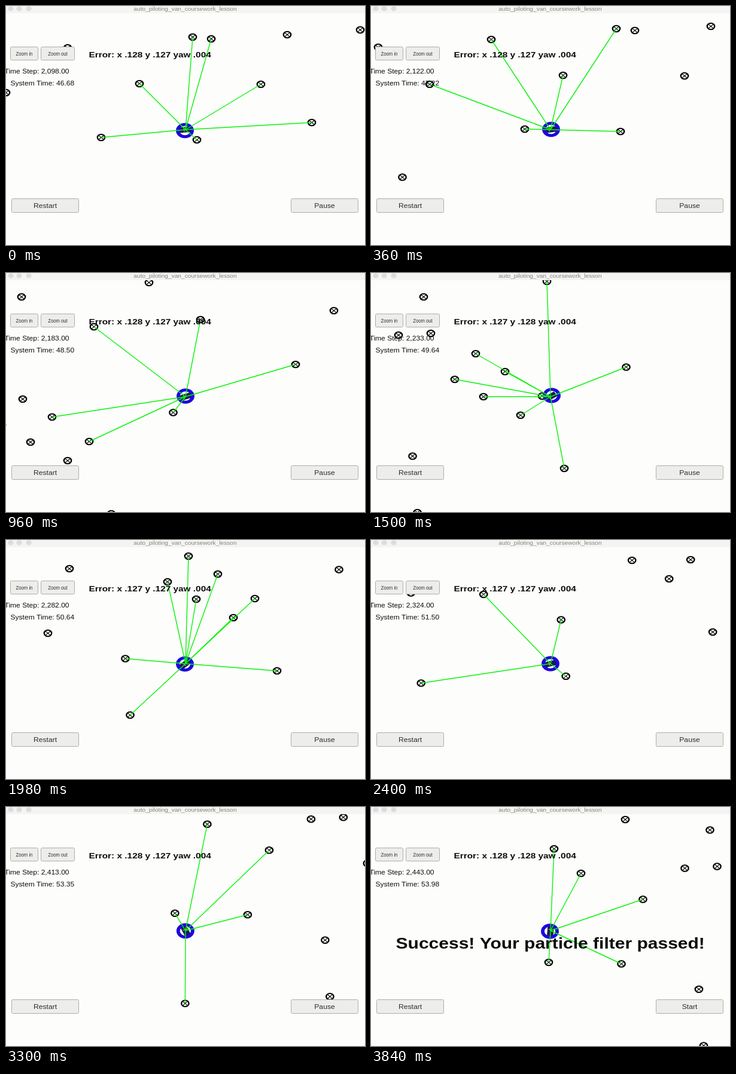
These frames come from a looping animation (600 by 400 pixels, 3960 ms). An HTML page with a canvas:

```html
<!DOCTYPE html>
<html lang="en">
<head>
<meta charset="utf-8">
<title>Particle filter</title>
<style>
  html, body { margin: 0; width: 100%; height: 100%; overflow: hidden; background: #fdfdfc; }
  canvas { display: block; }
</style>
</head>
<body>
<canvas id="stage" width="600" height="400"></canvas>
<script>
const ctx = document.getElementById('stage').getContext('2d');
const LOOP = 3960, FRAME = 60;
const ASPECT = 1.17;              // the whole picture is wider than it is tall
const CAR = { x: 300, y: 207 };
const SENSOR_RANGE = 231;

// Camera travel: shift in px, velocity in px per time step, ring offset from the car
const keys = [
  { t: 0,    step: 2098, sys: 46.68, x: 0,     y: 0,      vx: 4.2,  vy: -.5,  err: [128, 127], ox: -1, oy: 1.5 },
  { t: 360,  step: 2122, sys: 47.22, x: 98,    y: -14,    vx: 3.95, vy: -.68, err: [128, 127], ox: 1,  oy: -.5 },
  { t: 960,  step: 2183, sys: 48.50, x: 325,   y: -67,    vx: 3.35, vy: -1.2, err: [128, 127], ox: 0,  oy: -1 },
  { t: 1500, step: 2233, sys: 49.64, x: 472,   y: -143,   vx: 2.8,  vy: -1.9, err: [127, 128], ox: 2,  oy: -2 },
  { t: 1980, step: 2282, sys: 50.64, x: 602,   y: -251,   vx: 2.5,  vy: -2.3, err: [127, 127], ox: -1, oy: .5 },
  { t: 2880, step: 2372, sys: 52.48, x: 857.5, y: -310.5, vx: 2.55, vy: 1.03, err: [128, 127], ox: 1,  oy: -.5 },
  { t: 3600, step: 2443, sys: 53.98, x: 950.5, y: -144.5, vx: -.2,  vy: 2.7,  err: [128, 128], ox: -1, oy: 1 }
];

const landmarks = [
  [103, 70], [312, 52], [343, 55], [470, 48], [592, 40], [0, 145], [223, 130], [426, 131],
  [159, 220], [319, 224], [511, 195], [-86, 83], [-45.5, 300.5], [-299, 107], [-178, 157],
  [-297, 278], [-248, 308], [-186, 349], [-284, 350], [-222, 381], [-149, 470],
  [-384, 183], [-426, 247], [-372, 244], [-332, 321], [-402.5, 449.5], [-394.5, 544],
  [-496, 299], [-532, 407], [-653.5, 404.5], [-636.5, 555.5],
  [-525.5, 165.5], [-644.5, 214.5], [-599.5, 255.5]
];

const lerp = (a, b, u) => a + (b - a) * u;

function hermite(p, q, v, w, u) {
  const s = 1 - u;
  return s * s * ((1 + 2 * u) * p + u * v) + u * u * ((3 - 2 * u) * q - s * w);
}

function stateAt(time) {
  const end = keys.length - 1;
  const t = Math.min(time, keys[end].t);
  let i = 0;
  while (i < end - 1 && t >= keys[i + 1].t) i++;
  const a = keys[i], b = keys[i + 1];
  const u = (t - a.t) / (b.t - a.t), span = b.step - a.step;
  const mix = name => lerp(a[name], b[name], u);
  return {
    step: Math.round(mix('step')),
    sys: mix('sys'),
    x: hermite(a.x, b.x, a.vx * span, b.vx * span, u),
    y: hermite(a.y, b.y, a.vy * span, b.vy * span, u),
    heading: Math.atan2(-mix('vy'), -mix('vx')),
    ox: mix('ox'), oy: mix('oy'),
    err: (u < 1 ? a : b).err,
    done: time >= keys[end].t
  };
}

// Runs draw() around a point, with the horizontal stretch applied
function at(x, y, draw, stretch = ASPECT) {
  ctx.save();
  ctx.translate(x, y);
  ctx.scale(stretch, 1);
  draw();
  ctx.restore();
}

function text(str, x, y, size, { bold, center, color = '#0c0c0c', stretch } = {}) {
  at(x, y, () => {
    ctx.font = `${bold ? 'bold ' : ''}${size}px "Liberation Sans", Arial, sans-serif`;
    ctx.textAlign = center ? 'center' : 'left';
    ctx.fillStyle = color;
    ctx.fillText(str, 0, 0);
  }, stretch);
}

function button(label, x, y, w, h, size, stretch) {
  ctx.beginPath();
  ctx.roundRect(x + .5, y + .5, w - 1, h - 1, 2);
  ctx.fillStyle = '#ededec';
  ctx.fill();
  ctx.strokeStyle = '#aeaea6';
  ctx.lineWidth = 1;
  ctx.stroke();
  text(label, x + w / 2, y + h / 2 + 3.8, size, { center: true, color: '#2d2d2b', stretch });
}

function circle(r) {
  ctx.beginPath();
  ctx.arc(0, 0, r, 0, 2 * Math.PI);
}

function marker(x, y) {
  at(x, y, () => {
    ctx.strokeStyle = '#000';
    ctx.lineWidth = 2;
    circle(5.3);
    ctx.stroke();
    ctx.lineWidth = 1;
    ctx.beginPath();
    ctx.moveTo(-3.6, -3.6); ctx.lineTo(3.6, 3.6);
    ctx.moveTo(3.6, -3.6); ctx.lineTo(-3.6, 3.6);
    ctx.stroke();
  });
}

function car({ ox, oy, heading }) {
  at(CAR.x, CAR.y, () => {
    ctx.rotate(heading);
    ctx.fillStyle = '#1c1a55';
    ctx.fillRect(-9, -4.5, 18, 9);
    ctx.fillStyle = '#77778c';
    ctx.fillRect(1, -3, 2, 6);
  });
  at(CAR.x + ox, CAR.y + oy, () => {
    ctx.strokeStyle = '#1c06dc';
    ctx.lineWidth = 5;
    circle(10.3);
    ctx.stroke();
  });
}

function sensorLine(x, y) {
  ctx.strokeStyle = '#0cf20c';
  ctx.lineWidth = 1.4;
  ctx.beginPath();
  ctx.moveTo(CAR.x, CAR.y);
  ctx.lineTo(x, y);
  ctx.stroke();
}

function titleBar() {
  ctx.fillStyle = '#f4f4f3';
  ctx.fillRect(0, 0, 600, 12);
  for (const x of [8, 22, 38]) {
    at(x, 4.5, () => {
      circle(4);
      ctx.fillStyle = '#dcdcda';
      ctx.fill();
    });
  }
  text('auto_piloting_van_coursework_lesson', 299.5, 8, 8.7, { center: true, color: '#858378' });
}

function render(time) {
  const s = stateAt(time);
  ctx.fillStyle = '#fdfdfc';
  ctx.fillRect(0, 0, 600, 400);

  const points = landmarks.map(([x, y]) => [x + s.x, y + s.y]);
  const inRange = ([x, y]) => Math.hypot(x - CAR.x, (y - CAR.y) * ASPECT) < SENSOR_RANGE;
  points.forEach(p => marker(...p));
  car(s);
  points.filter(inRange).forEach(p => sensorLine(...p));

  titleBar();
  button('Zoom in', 7, 68, 47, 23, 9.4, .82);
  button('Zoom out', 58, 68, 57, 23, 9.4, .82);
  button('Restart', 9, 322, 113, 24, 10.4);
  button(s.done ? 'Start' : 'Pause', 476, 322, 113, 24, 10.4);
  text(`Time Step: ${s.step.toLocaleString('en-US')}.00`, -2.5, 113.3, 10.3);
  text(`System Time: ${s.sys.toFixed(2)}`, 7.5, 132.5, 10.3);
  text(`Error: x .${s.err[0]} y .${s.err[1]} yaw .004`, 138.5, 85.5, 13.15, { bold: true });
  if (s.done) text('Success! Your particle filter passed!', 299.7, 237, 25.65, { bold: true, center: true });
}

const start = performance.now();
function tick() {
  const time = (performance.now() - start) % LOOP;
  render(Math.floor(time / FRAME) * FRAME);
  requestAnimationFrame(tick);
}
tick();
</script>
</body>
</html>
```
